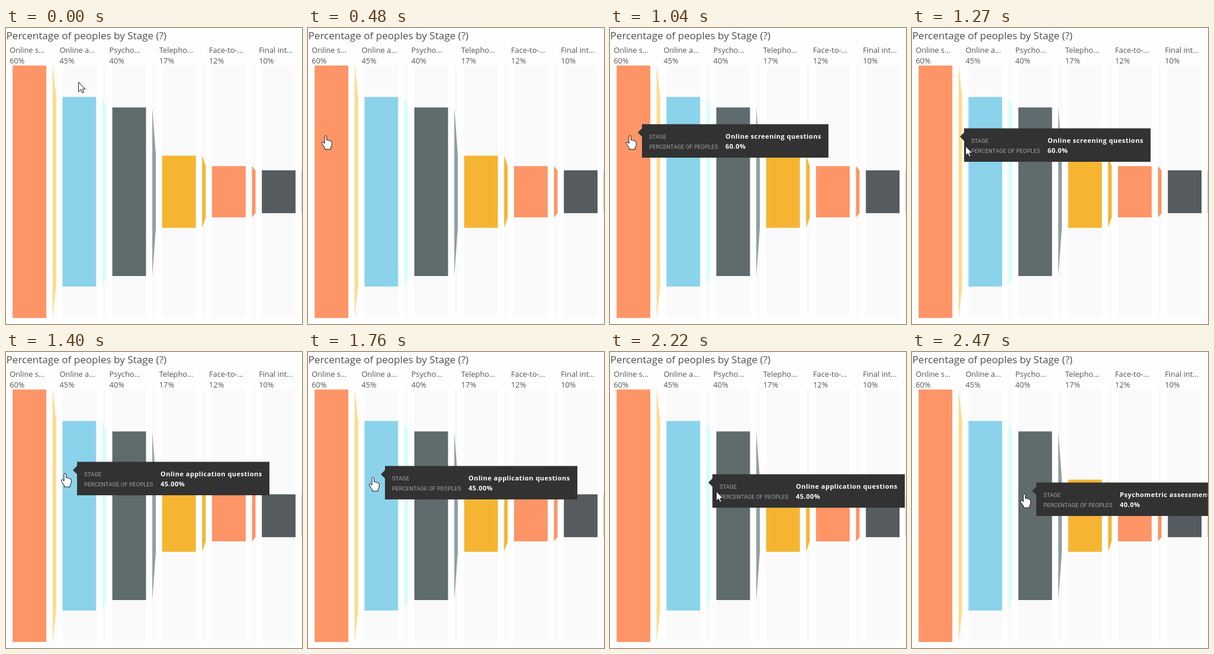
These frames come from a looping animation (500x500 px, 3.12 s). An HTML page:

```html
<!DOCTYPE html>
<html lang="en">
<head>
<meta charset="utf-8">
<title>Percentage of peoples by Stage</title>
<style>
  html, body { margin: 0; height: 100%; overflow: hidden; background: #fefefe; }
  svg { display: block; width: 100vw; height: 100vh; font-family: "Open Sans", "Noto Sans", sans-serif; }
  .title { font-size: 17.1px; fill: #4f4f4f; }
  .label { font-size: 12.8px; fill: #555; }
  .key { font: 9.6px Roboto, sans-serif; fill: #a3a3a3; }
  .value { font-size: 11px; font-weight: 700; letter-spacing: .5px; fill: #fff; }
  .cursor { fill: #fff; stroke: #111; stroke-linejoin: round; }
</style>
</head>
<body>
<svg viewBox="0 0 500 500">
  <text class="title" x="0.5" y="19">Percentage of peoples by Stage (?)</text>
  <g id="chart"></g>
  <g id="tip">
    <path id="box" fill="#323232"/>
    <text class="key" x="12" y="24.5">STAGE</text>
    <text class="key" x="12" y="41.2">PERCENTAGE OF PEOPLES</text>
    <text class="value" id="stageName" x="141" y="24.5"></text>
    <text class="value" id="percent" x="141" y="41.2"></text>
  </g>
  <path id="arrow" class="cursor" d="M.5.5V16.7L4.3 13.1 6.9 18.5 9.4 17.4 6.9 12.1H11.9Z"/>
  <path id="hand" class="cursor" d="M-2 12V.5Q-2-1-.2-1T1.6.5V6.5Q3.5 5 4.8 7.2 6.8 6.1 8 8.2 10.3 7.5 10.3 10.3V14Q10 17 8.3 19V22H-1.5V19.5L-6.4 12.5Q-7.3 10.5-5.8 9.7-4.2 9.3-2 12Z"/>
</svg>
<script>
const LOOP = 3120, STEP = 47, TIP_START = 700;
const PITCH = 84.2, WIDTH = 56.9, MIDDLE = 276.6;
const $ = id => document.getElementById(id);

const bars = [
  { label: "Online s...", percent: 60, color: "#fd9567", link: "#fddc8d", name: "Online screening questions", value: "60.0%" },
  { label: "Online a...", percent: 45, color: "#8ad3eb", link: "#d4feff", name: "Online application questions", value: "45.00%" },
  { label: "Psycho...", percent: 40, color: "#5f6b6d", link: "#8f9fa2", name: "Psychometric assessment", value: "40.0%" },
  { label: "Telepho...", percent: 17, color: "#f5b532" },
  { label: "Face-to-...", percent: 12, color: "#fd9567" },
  { label: "Final int...", percent: 10, color: "#555b5f" }
];
bars.forEach((bar, i) => {
  bar.x = 11.2 + PITCH * i;
  bar.half = 3.54 * bar.percent + 0.8;
});

const rect = (x, half, width, fill) =>
  `<rect x="${x}" y="${MIDDLE - half}" width="${width}" height="${2 * half}" fill="${fill}"/>`;

$("chart").innerHTML = bars.map((bar, i) => {
  const { x, half, color } = bar, next = (bars[i + 1] || bar).half, linkX = x + 67.5;
  return rect(x, bars[0].half, WIDTH, "#fafafa") +
    rect(linkX, bars[0].half, 6, "#fafafa") +
    rect(x, half, WIDTH, color) +
    `<path fill="${bar.link || color}" d="M${linkX} ${MIDDLE - half}l6 ${half - next}v${2 * next}l-6 ${half - next}z"/>` +
    `<text class="label" x="${x - 5}" y="42">${bar.label}</text>` +
    `<text class="label" x="${x - 5}" y="60">${bar.percent}%</text>`;
}).join("");

const barAt = (x, y) => bars.find(bar =>
  x >= bar.x && x <= bar.x + WIDTH + 1 && Math.abs(y - MIDDLE) <= bar.half);

// Pointer moves: start time, end time, destination x and y.
const moves = [
  [102, 480, 30, 183], [610, 760, 34, 183],
  [1025, 1170, 68, 190], [1170, 1270, 90, 199], [1270, 1480, 110, 213],
  [2093, 2180, 153, 227], [2180, 2220, 179, 235], [2220, 2470, 190, 241]
];

// Each move is cut into equal steps; the tooltip stays put between bars.
const poses = [{ t: 0, x: 122, y: 91 }];
for (const [start, end, toX, toY] of moves) {
  const from = poses[poses.length - 1], count = Math.round((end - start) / STEP);
  let tip = from.tip;
  for (let k = 1; k <= count; k++) {
    const p = k / count, t = start + (end - start) * p;
    const x = from.x + (toX - from.x) * p, y = from.y + (toY - from.y) * p;
    const bar = barAt(x, y);
    if (bar && t > TIP_START) tip = { bar, x: Math.round(x + 20), y: Math.round(y) - 20.5 };
    poses.push({ t, x, y, bar, tip });
  }
}

const place = (node, x, y) => node.setAttribute("transform", `translate(${x} ${y})`);
const show = (node, on) => node.style.display = on ? "" : "none";

function render(time) {
  const { x, y, bar, tip } = poses.filter(pose => pose.t <= time).pop();
  for (const [id, on] of [["hand", bar], ["arrow", !bar]]) {
    show($(id), on);
    place($(id), Math.round(x), Math.round(y));
  }
  show($("tip"), tip);
  if (!tip) return;
  $("stageName").textContent = tip.bar.name;
  $("percent").textContent = tip.bar.value;
  const width = Math.round($("stageName").getComputedTextLength() + 153);
  $("box").setAttribute("d", `M0 0H${width}V56.5H0V21L-7 14 0 7Z`);
  place($("tip"), tip.x, tip.y);
}

const start = performance.now();
(function tick() {
  render((performance.now() - start) % LOOP);
  requestAnimationFrame(tick);
})();
</script>
</body>
</html>
```
